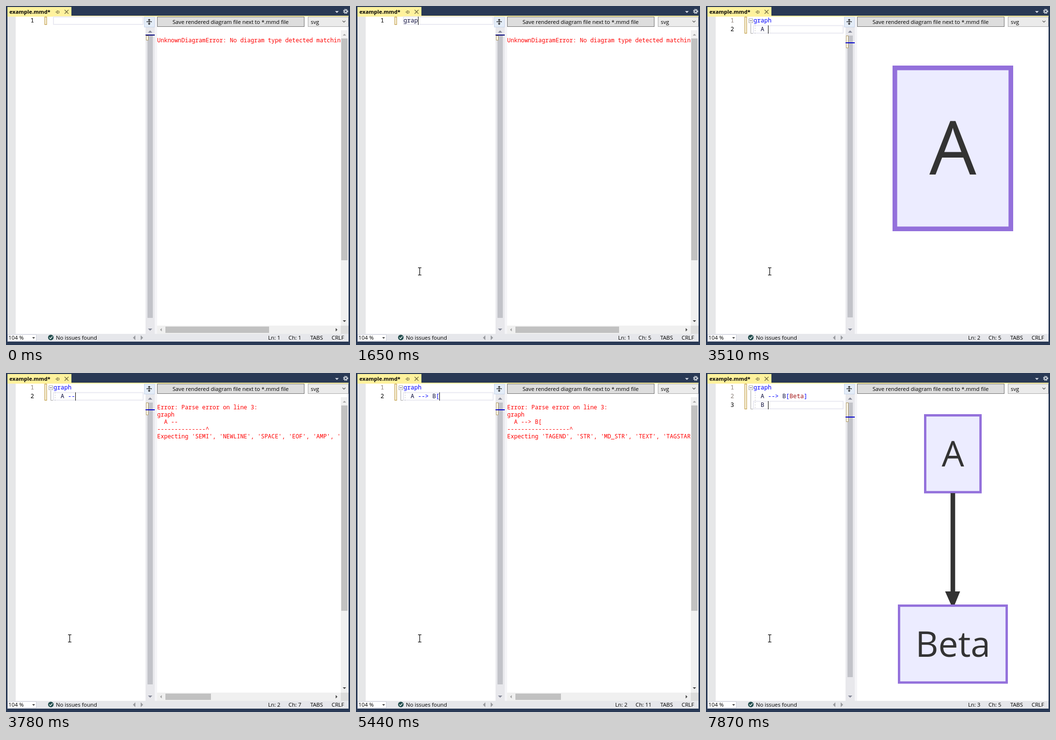
An HTML page with a canvas for the animation above (8000 ms loop, 710 by 700 pixels).

```html
<!DOCTYPE html>
<html lang="en">
<head>
<meta charset="utf-8">
<title>Diagram editor</title>
<style>
html, body { margin: 0; width: 100%; height: 100%; overflow: hidden; background: #293955; }
canvas { display: block; }
</style>
</head>
<body>
<canvas id="stage" width="710" height="700"></canvas>
<script>
const ctx = document.getElementById('stage').getContext('2d');
const LOOP = 8000, CHAR = 7.43, LEFT = 98, ROW = 18;
const UI = '11.3px "Open Sans", sans-serif';
const TAB = 'bold 11px "Open Sans", sans-serif';
const CODE = '12.38px "Noto Sans Mono", monospace';
const ERROR = '11.91px "Noto Sans Mono", monospace';

// Each edit: time and full text, with | marking the caret.
const LINK = 'graph\n  A --> ';
const edits = [
  [0, '|'], [990, 'g|'], [1210, 'gr|'], [1370, 'gra|'], [1560, 'grap|'], [1910, 'graph|'],
  [2370, 'graph\n|'], [2750, 'graph\n |'], [2990, 'graph\n  |'],
  [3350, 'graph\n  A|'], [3510, 'graph\n  A |'], [3640, 'graph\n  A -|'],
  [3780, 'graph\n  A --|'], [4020, 'graph\n  A -->|'], [4360, LINK + '|'],
  [4940, LINK + 'B|'], [5270, LINK + 'B[|'], [5650, LINK + 'B[]|'],
  [6040, LINK + 'B[|]'], [6070, LINK + 'B[B|]'], [6320, LINK + 'B[Be|]'],
  [6500, LINK + 'B[Bet|]'], [6570, LINK + 'B[Beta|]'], [6790, LINK + 'B[Beta]|'],
  [7080, LINK + 'B[Beta]\n  |'], [7710, LINK + 'B[Beta]\n  B|'], [7870, LINK + 'B[Beta]\n  B |']
];
const caretOff = [[0, 200], [730, 990], [4770, 4940], [7420, 7710]];
const nodeWidth = { A: 119, B: 119, Be: 158, Bet: 188, Beta: 227 };

function rect(x, y, w, h, fill, stroke, line = 1) {
  ctx.fillStyle = fill;
  ctx.fillRect(x, y, w, h);
  if (!stroke) return;
  ctx.strokeStyle = stroke;
  ctx.lineWidth = line;
  ctx.strokeRect(x + line / 2, y + line / 2, w - line, h - line);
}

function text(str, x, y, font = UI, color = '#000', align = 'left') {
  ctx.font = font;
  ctx.fillStyle = color;
  ctx.textAlign = align;
  ctx.fillText(str, x, y);
}

function shape(color, ...points) {
  ctx.fillStyle = color;
  ctx.beginPath();
  points.forEach(([x, y]) => ctx.lineTo(x, y));
  ctx.fill();
}

function line(color, width, ...points) {
  ctx.strokeStyle = color;
  ctx.lineWidth = width;
  ctx.beginPath();
  points.forEach(([x, y]) => ctx.lineTo(x, y));
  ctx.stroke();
}

// Small triangle: (dx, dy) points from its base to its tip.
function arrow(x, y, dx, dy, color) {
  shape(color, [x + dx, y + dy], [x - dy, y + dx], [x + dy, y - dx]);
}

function drawTab() {
  rect(0, 0, 710, 700, '#293955');
  rect(3, 2, 132, 18, '#fff29d');
  rect(3, 20, 704, 2, '#fff29d');
  text('example.mmd*', 7, 16, TAB);
  line('#6b6540', 1, [102, 12.5], [105.5, 12.5], [105.5, 9], [105.5, 16]);
  line('#6b6540', 1, [105.5, 10.5], [109.5, 10.5], [109.5, 14.5], [105.5, 14.5]);
  line('#6b6540', 1.3, [121, 8], [129, 16]);
  line('#6b6540', 1.3, [129, 8], [121, 16]);
  arrow(683, 10.5, 0, 3.8, '#dde3ee');
  ctx.setLineDash([2, 1.5]);
  ctx.strokeStyle = '#ced4dd';
  ctx.lineWidth = 2;
  ctx.beginPath();
  ctx.arc(701, 11, 4.3, 0, 7);
  ctx.stroke();
  ctx.setLineDash([]);
  ctx.lineWidth = 1.8;
  ctx.beginPath();
  ctx.arc(701, 11, 2.7, 0, 7);
  ctx.stroke();
}

function drawStatus(ln, ch) {
  rect(3, 677, 704, 16, '#e6e7eb');
  rect(3, 678, 60, 14, '#fff', '#cccedb');
  text('104 %', 5, 689);
  arrow(57, 684, 0, 3, '#333');
  ctx.fillStyle = '#244f4f';
  ctx.beginPath();
  ctx.arc(92.5, 684.5, 5.7, 0, 7);
  ctx.fill();
  line('#fff', 1.4, [89.5, 684.5], [91.8, 687], [95.8, 682.3]);
  text('No issues found', 103, 689);
  arrow(267, 685, -5, 0, '#999ba0');
  arrow(278, 685, 5, 0, '#999ba0');
  const shift = ch > 9 ? 6 : 0;
  text('Ln: ' + ln, 541 - shift, 689);
  text('Ch: ' + ch, 583 - shift, 689);
  text('TABS', 628, 689);
  text('CRLF', 672, 689);
}

function drawCode(str, x, y, inBrackets) {
  const parts = str.match(/^graph$|-+>?|[\[\]]|[^\[\]\- ]+| +/g) || [];
  let col = 0, label = false;
  for (const part of parts) {
    const px = x + col * CHAR;
    if (part === ']') label = false;
    if (label && inBrackets) rect(px, y - 13, part.length * CHAR, 16, '#e2e0dc');
    const color = label ? '#a31515' : /^(graph|-.*|\[|\])$/.test(part) ? '#0000ff' : '#101040';
    text(part, px, y, CODE, color);
    if (part === '[') label = true;
    col += part.length;
  }
}

function drawEditor(lines, ln, ch, caretOn) {
  const count = lines.length, bottom = 21 + count * ROW, top = 22 + (ln - 1) * ROW;
  rect(3, 22, 17, 655, '#e6e7e8');
  rect(20, 22, 268, 655, '#fff');
  rect(97, top - 0.5, 187, 17.5, '#fff', '#eaeaf2', 2);
  rect(79.5, 22, 5, bottom - 22, '#fffdf0', '#c3a04f', 1.3);

  lines.forEach((str, i) => {
    const y = 34 + i * ROW, current = i === ln - 1;
    text(i + 1, 58, y, CODE, current ? '#000' : '#8a7f78', 'right');
    drawCode(str, LEFT, y, current && /]$/.test(str) && ch <= str.length);
  });
  if (/A/.test(lines[1])) {
    rect(88, 26, 9, 9, '#fff', '#a5a5a5');
    line('#555', 1, [90, 30.5], [95, 30.5]);
    line('#a5a5a5', 1, [92.5, 36], [92.5, bottom - 0.5], [97, bottom - 0.5]);
    ctx.setLineDash([2, 3]);
    line('#c4c4c4', 1, [101.5, 40], [101.5, bottom]);
    ctx.setLineDash([]);
  }
  if (caretOn) rect(Math.round(LEFT + (ch - 1) * CHAR), top, 1, 17, '#000');

  // Scroll bar with change marks and caret position.
  rect(288, 22, 19, 655, '#e8e8ec');
  rect(307, 22, 5, 655, '#f4f4f7');
  rect(285, 22, 22, 22, '#e3ecf8', '#c9d6ea');
  line('#222', 1.4, [290, 32.5], [301, 32.5]);
  line('#222', 1.2, [295.5, 28], [295.5, 37]);
  arrow(295.5, 29.5, 0, -3, '#222');
  arrow(295.5, 36, 0, 3, '#222');
  arrow(297.5, 55, 0, -4.5, '#868999');
  arrow(297.5, 666, 0, 4.5, '#868999');
  rect(292, 61, 11, [583, 582, 567][count - 1], '#c2c3c9');
  rect(289, 61, 5, [10, 26, 40][count - 1], '#fffdf5', '#b09a62');
  rect(288, [59, 75, 90][ln - 1], 19, 2, count > 1 ? '#0000cd' : '#00007c');
}

function drawToolbar() {
  rect(312, 22, 395, 655, '#fff');
  rect(312, 22, 304, 21, '#ddd', '#707070');
  text('Save rendered diagram file next to *.mmd file', 463.5, 37, UI, '#000', 'center');
  rect(623, 22, 84, 21, '#ebebeb', '#acacac');
  text('svg', 629, 37);
  line('#555', 1.2, [694.5, 30.5], [697.5, 33.5], [700.5, 30.5]);
}

function drawError(message, thumbW, thumbH) {
  ctx.save();
  ctx.beginPath();
  ctx.rect(312, 45, 379, 615);
  ctx.clip();
  message.forEach((str, i) => text(str, 312, 75 + i * 15, ERROR, '#ff0000'));
  ctx.restore();
  rect(691, 50, 15, 610, '#f0f0f0');
  rect(692, 67, 13, thumbH, '#c1c1c1');
  rect(312, 660, 379, 17, '#f0f0f0');
  rect(329, 662, thumbW, 13, '#c1c1c1');
  rect(691, 660, 16, 17, '#dcdcdc');
  arrow(698.5, 61, 0, -3.5, '#a3a3a3');
  arrow(698.5, 649, 0, 3.5, '#404040');
  arrow(321.5, 668.5, -3.5, 0, '#a3a3a3');
  arrow(680.5, 668.5, 3.5, 0, '#404040');
}

function drawNode(label, y, w, h, border, size, base) {
  rect(509.5 - w / 2, y, w, h, '#ececff', '#9370db', border);
  text(label, 509.5, base, size + 'px "Open Sans", sans-serif', '#333', 'center');
}

function drawPreview(str, lines) {
  const second = lines[1] || '';
  const label = /B\[(\w+)\]/.exec(second)?.[1] || (/> B$/.test(second) ? 'B' : '');
  if (lines.length < 2) {
    return drawError(['UnknownDiagramError: No diagram type detected matching given configuration for text: ' + str], 214, 458);
  }
  if (label) {
    drawNode('A', 85, 119, 163.5, 4.8, 73, 193);
    line('#333', 9.5, [509.5, 248], [509.5, 455]);
    shape('#333', [493.5, 451], [524.5, 451], [513, 479], [506, 479]);
    return drawNode(label, 478, nodeWidth[label], 163.5, 4.8, 73, 586);
  }
  if (/A ?$/.test(second)) return drawNode('A', 123, 249, 342, 9.6, 153, 348);
  if (!second.trim()) return;
  if (/ -$/.test(second)) {
    return drawError(['Error: Lexical error on line 2. Unrecognized text.', 'graph', second, '---------^'], 94, 491 - 67);
  }
  const expected = /\[/.test(second) ? "'TAGEND', 'STR', 'MD_STR', 'TEXT', 'TAGSTART', got"
    : />/.test(second) ? "'AMP', 'ALPHA', 'COLON', 'PIPE', 'TESTSTR', 'DOWN'"
    : "'SEMI', 'NEWLINE', 'SPACE', 'EOF', 'AMP', 'LINK'";
  drawError(['Error: Parse error on line 3:', 'graph', second,
    '-'.repeat(second.length + 8) + '^', 'Expecting ' + expected], 94, 424);
}

function drawPointer(t) {
  if (t < 60) return;
  const rest = (1 - Math.min(1, (t - 60) / 600)) ** 2;
  const x = 131 + 317 * rest, y = 548 + 77 * rest;
  if (x > 288) {
    const tip = [[0, 0], [0, 16], [4, 12.5], [6.5, 18], [8.5, 17], [6, 11.5], [11, 11.5]]
      .map(([dx, dy]) => [x + dx, y + dy]);
    shape('#fff', ...tip);
    return line('#000', 1, ...tip, tip[0]);
  }
  line('#000', 1.2, [x + 0.5, y - 7], [x + 0.5, y + 7]);
  for (const dy of [-7.5, 7.5]) line('#000', 1.2, [x - 3, y + dy], [x + 4, y + dy]);
}

function draw(now) {
  const t = now % LOOP;
  const marked = edits.filter(([start]) => start <= t).pop()[1];
  const before = marked.split('|')[0].split('\n');
  const str = marked.replace('|', ''), lines = str.split('\n');
  const ln = before.length, ch = before[ln - 1].length + 1;
  const caretOn = !caretOff.some(([from, to]) => t >= from && t < to);
  drawTab();
  drawToolbar();
  drawEditor(lines, ln, ch, caretOn);
  drawPreview(str, lines);
  drawStatus(ln, ch);
  drawPointer(t);
}

const start = performance.now();
function frame() {
  draw(performance.now() - start);
  requestAnimationFrame(frame);
}
frame();
</script>
</body>
</html>
```
